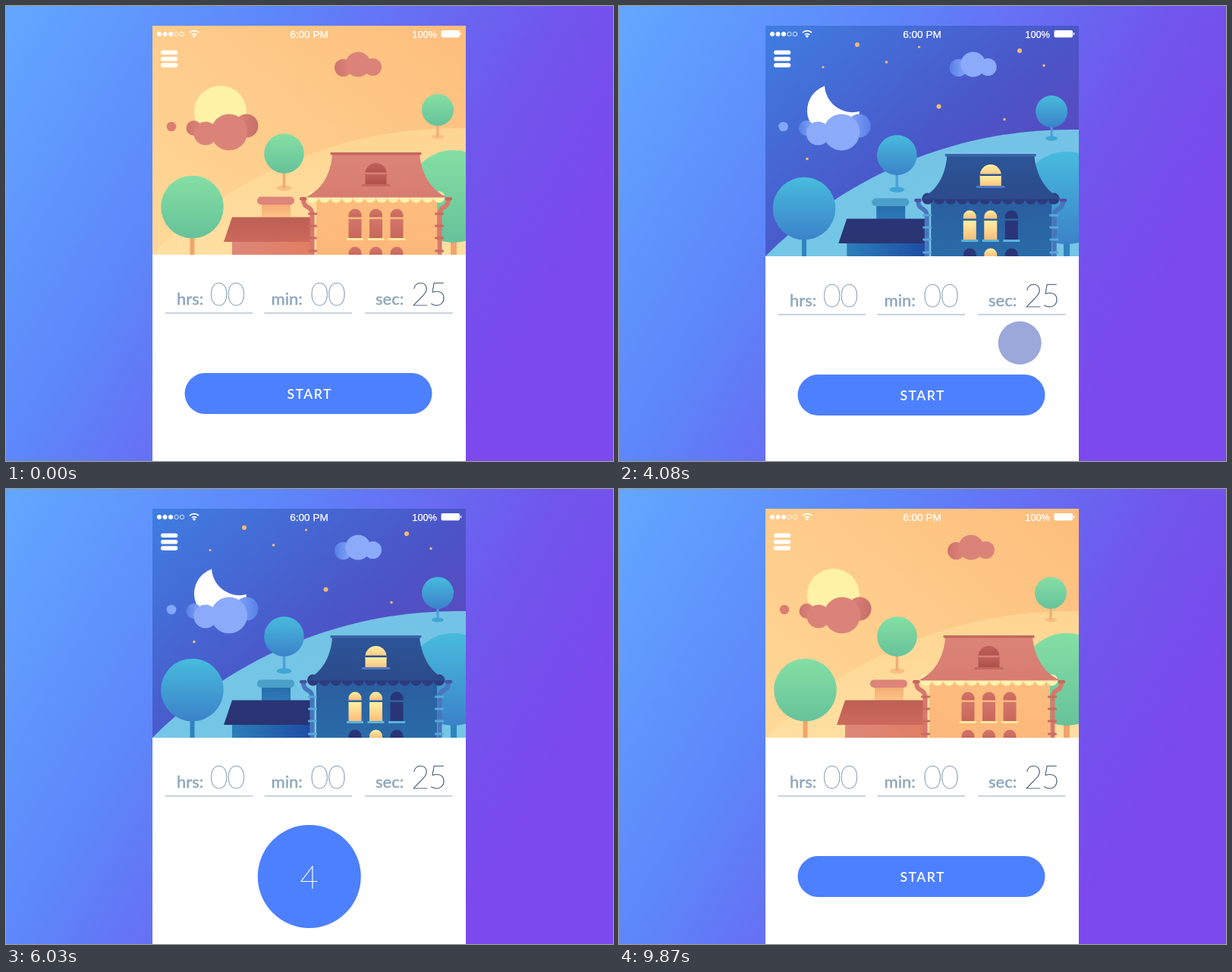
Write an HTML page that moves like this. It is 800x600 px and loops after 9.9 s.

```html
<!DOCTYPE html>
<html lang="en">
<head>
<meta charset="utf-8">
<title>Day and night timer</title>
<style>
  html, body { margin: 0; height: 100%; overflow: hidden; }
  svg { display: block; width: 800px; height: 600px; }
  text { font-family: Lato, "Open Sans", sans-serif; }
  .status { font: 13.6px "Liberation Sans", Arial, sans-serif; fill: #fff; stroke: #fff; stroke-width: .25; }
  .label { font-size: 22px; font-weight: 500; fill: #8ea7bb; stroke: #8ea7bb; stroke-width: .35; }
  .thin { font-size: 42px; font-weight: 200; letter-spacing: -1.5px; stroke-width: .5; }
</style>
</head>
<body>
<svg id="stage" viewBox="0 0 800 600"></svg>
<script>
const stage = document.getElementById('stage');
let defs = '';

// Each entry: day colours, night colours, gradient direction (v, h, d = falling, u = rising)
const palette = {
  sky: [['#ffdb9a', '#fdbd7c'], ['#3f7ee1', '#4b55c8', '#6a3cb3'], 'ud'],
  hill: [['#fed592', '#ffe4a8'], ['#74c3e6', '#74c8e6'], 'vv'],
  leaf: [['#84dfa4', '#67c29a'], ['#48bbdd', '#3b82c9'], 'vv'],
  trunk: [['#f0a56c'], ['#2f83bd']],
  stem: [['#f0ac74'], ['#4b9fdc']],
  shade: [['#f6c181'], ['#3fa6d3']],
  orb: [['#fdf2a6'], ['#fff']],
  cloud: [['#dc8379'], ['#8babfa']],
  puff: [['#de8479', '#c66f69'], ['#86a8fa', '#587fe6'], 'hh'],
  wisp: [['#cd746d', '#de8479'], ['#587fe6', '#86a8fa'], 'hh'],
  dot: [['#dd7d72'], ['#84a6fa']],
  vent: [['#f3aa70', '#fec587'], ['#266ba9', '#2d7cb8'], 'vv'],
  cap: [['#dd857a'], ['#4ba0c9']],
  shedRoof: [['#bd5f55', '#cb695c'], ['#293577', '#2b3472'], 'vv'],
  shed: [['#dd8779', '#e27d62'], ['#2b7fba', '#1c4ba3'], 'hh'],
  wall: [['#fdbd7e', '#fcb277'], ['#2a5d9f', '#2a78b0'], 'vv'],
  roof: [['#dc8478', '#d77c70'], ['#2c5597', '#2c4b8b'], 'vv'],
  ridge: [['#c5685f'], ['#3c65ac']],
  trim: [['#fff1ad'], ['#2d3a7e']],
  attic: [['#c0625a', '#ad4f46'], ['#fdefa3', '#fdc27e'], 'vv'],
  sill: [['#c5685f'], ['#5078c3']],
  lit: [['#d3766c', '#c8675a'], ['#fef0a3', '#fdbd79'], 'vv'],
  dark: [['#d3766c', '#c8675a'], ['#2a3577'], 'vv'],
  ledge: [['#ffe7a0'], ['#5ab4dd']],
  pipe: [['#d8786c'], ['#4876bd']],
  spout: [['#c5685f'], ['#4b4fa6']],
  band: [['#c96b61'], ['#55a9db']]
};
const axes = {
  v: [0, 0, 0, 1], h: [0, 0, 1, 0], d: [0, 0, 1, 1], u: [0, 1, 1, 0]
};

function gradient(id, colors, [x1, y1, x2, y2]) {
  const stops = colors.map((c, i) => `<stop offset="${i / (colors.length - 1)}" stop-color="${c}"/>`).join('');
  defs += `<linearGradient id="${id}" x1="${x1}" y1="${y1}" x2="${x2}" y2="${y2}">${stops}</linearGradient>`;
}

const circle = (x, y, r, fill) => `<circle cx="${x}" cy="${y}" r="${r}" fill="${fill}"/>`;
const rect = (x, y, w, h, fill, rx = 0) =>
  `<rect x="${x}" y="${y}" width="${w}" height="${h}" rx="${rx}" fill="${fill}"/>`;
const path = (d, fill, more = '') => `<path d="${d}" fill="${fill}" ${more}/>`;
const text = (x, y, s, cls, more = '') => `<text x="${x}" y="${y}" class="${cls}" ${more}>${s}</text>`;

// Group that drifts with the pull (--p) and with the passing wipe (--b)
const drift = (px, py, content, bx = 0) =>
  `<g style="transform:translate(calc((var(--p)*${px} + var(--b)*${bx})*1px),calc(var(--p)*${py}*1px))">${content}</g>`;

function scene(night) {
  const c = {};
  for (const key in palette) {
    const colors = palette[key][night], id = key + night;
    if (colors.length > 1) gradient(id, colors, axes[palette[key][2][night]]);
    c[key] = colors.length > 1 ? `url(#${id})` : colors[0];
  }

  const tree = (x, y, r, w, ground) =>
    (ground ? `<ellipse cx="${x}" cy="${ground}" rx="${r * .38}" ry="${r * .14}" fill="${c.shade}"/>` : '') +
    rect(x - w / 2, y + r - 2, w, ground ? ground - y - r + 2 : 99, ground ? c.stem : c.trunk) +
    circle(x, y, r, c.leaf);

  const arch = (x, top, r, fill) => path(`M${x - r} ${top + r}a${r} ${r} 0 0 1 ${2 * r} 0v2.5h${-2 * r}z`, fill);
  const pane = (x, fill) =>
    arch(x, 267.5, 8.5, fill) + rect(x - 8.5, 281, 17, 25, fill) + rect(x - 11, 306, 22, 3, c.ledge);

  const pipe =
    path('M392 255C392 269 403.5 262 403.5 275V400', 'none', `stroke="${c.pipe}" stroke-width="6"`) +
    rect(387, 252, 9.5, 4.5, c.spout, 2) +
    [274, 290, 306, 323].map(y => rect(398, y - 1.5, 12, 3, c.band, 1)).join('');

  let trim = '';
  for (let i = 0; i < 12; i++) trim += circle(404.6 + i * 15.1, 252, 7.55, c.trim);

  const house =
    rect(409, 250, 159, 150, c.wall) + trim +
    path('M430 196H545C548 222 560 242 579 251V252.5H397V251C416 242 428 222 430 196Z', c.roof) +
    rect(427.5, 193, 120, 3.5, c.ridge, 1) +
    arch(487.5, 207, 14, c.attic) + rect(473.5, 219.5, 28, 2.5, c.roof) +
    rect(473.5, 222, 28, 13.5, c.attic) + rect(468.5, 235, 38, 3, c.sill, 1.5) +
    pane(460, c.lit) + pane(487.5, c.lit) + pane(515, c.dark) +
    arch(460, 317.5, 8.5, c.dark) + arch(487.5, 317.5, 8.5, c.lit) + arch(515, 317.5, 8.5, c.dark) +
    pipe + `<g transform="matrix(-1 0 0 1 975 0)">${pipe}</g>`;

  const shed =
    rect(337, 260, 38, 20, c.vent) + rect(331, 251.5, 49, 10.5, c.cap, 5) +
    rect(298, 310, 106, 90, c.shed) + path('M298 278.5H404V311H287Z', c.shedRoof);

  const stars = [[314, 51, 3], [395.5, 54, 1.6], [352.5, 74, 1.8], [269, 80.5, 1.5], [528, 59, 3],
    [560, 78.5, 1.7], [421.5, 132.5, 3], [508, 149.5, 1.7], [248, 201.5, 1.8]];
  const orb = night
    ? path('M271 105.5A34.5 34.5 0 1 0 317 139A37 37 0 0 1 271 105.5Z', c.orb)
    : circle(282.5, 139.5, 34.5, c.orb);

  return rect(193, 26, 413, 350, c.sky) +
    (night ? stars.map(([x, y, r]) => circle(x, y, r, '#fdba70')).join('') : '') +
    drift(0, 0, orb, 37) +
    drift(-.72, 0, circle(218, 159, 6.3, c.dot), 1) +
    drift(-.36, 0, circle(247.5, 161, 10, c.wisp) + circle(317, 158, 15.5, c.puff) +
      circle(263, 168, 15.5, c.cloud) + circle(294, 166.5, 24, c.cloud), -12.3) +
    drift(1.35, 0, circle(444.5, 81.5, 11.5, c.wisp) + circle(483.5, 80.5, 11.5, c.cloud) +
      circle(464, 77, 16.5, c.cloud)) +
    drift(0, 1, path('M193 328C300 220 450 158 606 161V400H193Z', c.hill)) +
    drift(0, 1.02, tree(590, 251, 61, 8)) +
    drift(.57, 1.04, tree(569, 137, 21, 3, 172.5)) +
    drift(-.08, 1.05, tree(366.5, 194.5, 26.3, 3.5, 240)) +
    drift(-.75, 1.04, tree(245.5, 265, 41.3, 6)) +
    drift(1.14, 1.03, shed + house);
}

function build() {
  const layers = scene(0) + `<g mask="url(#wipe)">${scene(1)}</g>`;
  defs += `
    <linearGradient id="back" gradientUnits="userSpaceOnUse" x1="28" y1="-16" x2="772" y2="414">
      <stop stop-color="#62a6ff"/><stop offset=".35" stop-color="#5d86fa"/>
      <stop offset=".72" stop-color="#7056ec"/><stop offset=".92" stop-color="#7b49ee"/>
    </linearGradient>
    <linearGradient id="fade"><stop stop-color="#000"/><stop offset=".006" stop-color="#fff"/>
      <stop offset=".994" stop-color="#fff"/><stop offset="1" stop-color="#000"/></linearGradient>
    <mask id="wipe" maskUnits="userSpaceOnUse" x="193" y="26" width="413" height="380">
      <rect id="veil" y="0" width="1000" height="420" fill="url(#fade)"/></mask>
    <clipPath id="view"><rect id="window" x="193" y="26" width="413" height="302"/></clipPath>
    <filter id="smear" x="-20%" width="140%" y="-10%" height="120%"><feGaussianBlur id="blur" stdDeviation="0 0"/></filter>`;

  const field = (name, x, value, vx, color, line) =>
    text(x, 394, name, 'label') + text(vx, 395, value, 'thin', `fill="${color}" stroke="${color}"`) +
    rect(line, 404.2, 115.5, 1.4, '#b3c1d0');

  let status = path('M245.8 39.5Q248 37.7 250.2 39.5L248 42Z', '#fff');
  for (const r of [3.6, 7])
    status += path(`M${248 - r * .85} ${41 - r * .85}a${r * 1.2} ${r * 1.2} 0 0 1 ${r * 1.7} 0`, 'none',
      'stroke="#fff" stroke-width="1.8"');
  for (let i = 0; i < 5; i++)
    status += `<circle cx="${202 + i * 7.5}" cy="37" r="2.7" stroke="#fff" stroke-width=".8" fill="${i < 3 ? '#fff' : 'none'}"/>`;
  status += text(399.5, 42, '6:00 PM', 'status', 'text-anchor="middle"') +
    text(568, 42, '100%', 'status', 'text-anchor="end" style="font-size:12.8px"') +
    rect(573.5, 32, 24.5, 9.5, '#fff', 2) + rect(598.7, 35, 1.5, 3.5, '#fff', .7);
  for (let i = 0; i < 3; i++) status += rect(204, 58.5 + i * 8.4, 22.3, 5.6, '#fff', 2.8);

  stage.innerHTML = `<defs>${defs}</defs>` +
    rect(0, 0, 800, 600, 'url(#back)') + rect(193, 26, 413, 574, '#fff') +
    `<g clip-path="url(#view)">${layers}</g>` + status +
    drift(0, 1,
      field('hrs:', 225, '00', 268.5, '#8fa6b9', 209.5) +
      field('min:', 349.5, '00', 401, '#8fa6b9', 340.5) +
      field('sec:', 487, '25', 534, '#4c6176', 473) +
      '<rect id="button" fill="#4d80ff"/>' +
      text(400.3, 517.8, 'START', '', 'id="start" text-anchor="middle" fill="#fff" font-size="17.5" font-weight="600" letter-spacing="1.5"') +
      text(399, 526.5, '', 'thin', 'id="count" text-anchor="middle" fill="#fff" stroke="#fff"') +
      '<circle id="touch" cx="528.2" cy="442.3" fill="#9ba8da"/>');
}
build();

const part = {};
for (const id of ['veil', 'window', 'blur', 'button', 'start', 'count', 'touch'])
  part[id] = document.getElementById(id);
const set = (id, attrs) => { for (const k in attrs) part[id].setAttribute(k, attrs[k]); };

const LOOP = 9900;
const cycles = [
  { touch: 20, lift: 560, pull: [40, 520], drop: [560, 980], squeeze: [430, 560], round: [540, 1085],
    count: 690, wipe: [979, 2342] },
  { touch: 3955, lift: 5130, pull: [3920, 5100], drop: [5100, 5600], squeeze: [4949, 5105], round: [5060, 5600],
    count: 5735, wipe: [6098, 7999] }
];

const ramp = (t, [a, b]) => Math.min(1, Math.max(0, (t - a) / (b - a)));
const smooth = (t, span) => { const u = ramp(t, span); return u * u * (3 - 2 * u); };
const easeOut = (t, span) => 1 - (1 - ramp(t, span)) ** 3;

function draw(t) {
  const second = t > 3700, c = cycles[+second];
  const flatten = [c.count + 2065, c.count + 2390], widen = [c.count + 2390, c.count + 2790];

  const pull = 39 * (smooth(t, c.pull) - smooth(t, c.drop));
  const u = Math.max(0, t - c.wipe[0]) / 240;
  stage.style.setProperty('--p', pull.toFixed(3));
  stage.style.setProperty('--b', (u * Math.exp(1 - u)).toFixed(4));
  set('window', { height: 302 + pull });

  const edge = 188 + 424 * ramp(t, c.wipe);
  set('veil', { x: second ? edge - 3 : edge - 997 });

  const narrow = time => smooth(time, c.squeeze) - smooth(time, widen);
  const n = narrow(t), tall = easeOut(t, c.round) - smooth(t, flatten);
  const w = 326 - 190 * n, h = 54 + 82 * tall;
  set('button', { x: 398.5 + 1.25 * n - w / 2, y: 511 - h / 2, width: w, height: h, rx: h / 2 });
  const smear = Math.abs(narrow(t + 5) - narrow(t - 5)) * 28;
  set('blur', { stdDeviation: smear.toFixed(2) + ' 0' });
  if (smear > .15) set('button', { filter: 'url(#smear)' });
  else part.button.removeAttribute('filter');

  const { count } = c, [r] = c.round;
  set('start', { opacity: 1 - ramp(t, [r, r + 130]) + ramp(t, [widen[0], widen[0] + 200]) });
  set('count', { opacity: ramp(t, [count - 60, count + 120]) - ramp(t, [flatten[0], flatten[0] + 200]) });
  part.count.textContent = Math.max(0, Math.min(25, Math.floor((t - count) * .01404)));

  const lift = smooth(t, [c.lift, c.lift + 220]);
  set('touch', { r: 33 * easeOut(t, [c.touch, c.touch + 260]) * (1 - .4 * lift), opacity: 1 - lift });
}

const begin = performance.now();
function tick() {
  draw((performance.now() - begin) % LOOP);
  requestAnimationFrame(tick);
}
draw(0);
requestAnimationFrame(tick);
</script>
</body>
</html>
```
